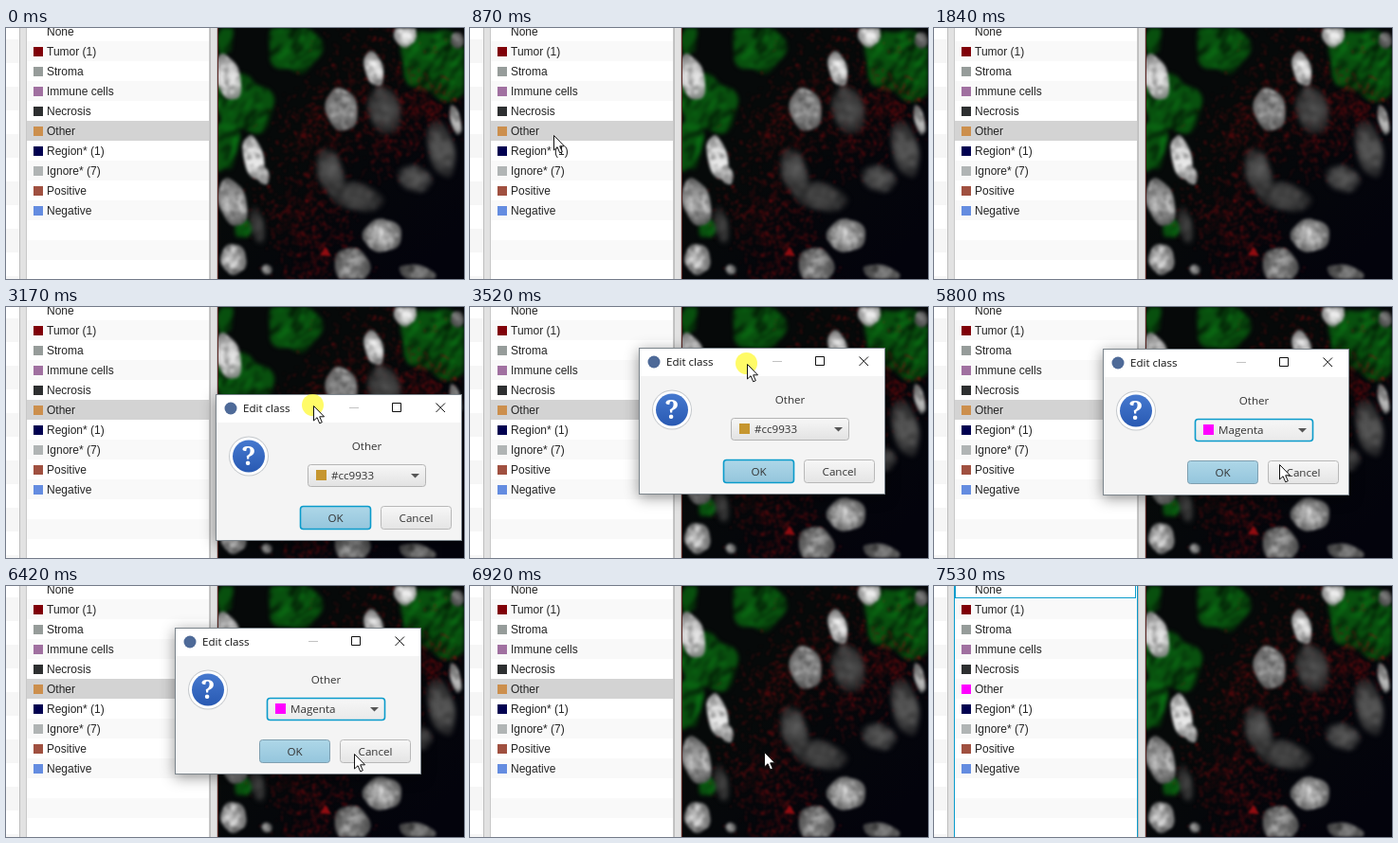
Recreate the animation shown at these times as an HTML page with a canvas. Size 483x265 px, loop 7.73 s.

```html
<!DOCTYPE html>
<html lang="en">
<head>
<meta charset="utf-8">
<title>Edit class colour</title>
<style>
html, body { margin: 0; width: 100%; height: 100%; overflow: hidden; background: #fff; }
canvas { display: block; width: 483px; height: 265px; }
</style>
</head>
<body>
<canvas id="stage" width="483" height="265"></canvas>
<script>
const W = 483, H = 265, LOOP = 7730, STEP = 70;
const ctx = document.getElementById('stage').getContext('2d');
const LIST_FONT = '12px "Liberation Sans", Arial, sans-serif';
const UI_FONT = '11.6px "Open Sans", "Noto Sans", sans-serif';
const BLUE = '#0a9bcb';

let seed = 11;
function rnd() {
  seed = (seed * 1664525 + 1013904223) % 4294967296;
  return seed / 4294967296;
}
const spread = () => (rnd() + rnd() + rnd() - 1.5) / 0.75;
const gray = (v, a = 1) => `rgba(${v},${v},${v},${a})`;
const within = (t, spans) => spans.some(([a, b]) => t >= a && t < b);

function box(c, x, y, w, h, fill) {
  c.fillStyle = fill;
  c.fillRect(x, y, w, h);
}

function disc(c, x, y, r, fill) {
  c.beginPath();
  c.arc(x, y, r, 0, 7);
  c.fillStyle = fill;
  c.fill();
}

function text(str, x, y, font, color, align = 'left') {
  ctx.font = font;
  ctx.fillStyle = color;
  ctx.textAlign = align;
  ctx.fillText(str, x, y);
}

function polygon(c, pts) {
  c.beginPath();
  for (let i = 0; i < pts.length; i += 2) c.lineTo(pts[i], pts[i + 1]);
  c.closePath();
}

function layer(paint) {
  const cv = document.createElement('canvas');
  cv.width = W;
  cv.height = H;
  paint(cv.getContext('2d'));
  return cv;
}

// ---- microscopy picture, painted once ----
// x, y, radii
const GREEN = [[304, 20, 25, 30], [250, 80, 30, 32], [231, 122, 13, 32], [231, 12, 8, 18],
  [456, 38, 38, 38], [251, 212, 9, 10]];
// x, y, radius
const RED = [[385, 58, 44], [402, 112, 34], [325, 105, 32], [312, 185, 40], [330, 240, 40], [448, 85, 24]];
// x, y, radii, brightness
const NUCLEI = [
  [399, 87, 16, 27, 75], [342, 152, 14, 25, 78], [369, 178, 29, 15, 66], [265, 208, 7, 20, 60],
  [431, 159, 18, 14, 88], [459, 128, 13, 32, 82], [354, 86, 16, 24, 150], [421, 6, 12, 14, 235],
  [388, 43, 10, 18, 220], [261, 137, 10, 25, 230], [271, 155, 6, 11, 195], [234, 52, 13, 25, 215],
  [239, 184, 15, 25, 165], [240, 244, 13, 17, 190], [397, 219, 20, 18, 175], [365, 251, 18, 20, 140],
  [434, 259, 19, 9, 110], [476, 13, 7, 9, 110], [474, 97, 5, 17, 165], [275, 255, 6, 5, 160]
];

// Uneven closed outline around the origin.
function blob(c, rx, ry, rough) {
  const p = rnd() * 6, q = rnd() * 6;
  c.beginPath();
  for (let a = 0; a < 6.28; a += .15) {
    const k = 1 + rough * (Math.sin(2 * a + p) + .7 * Math.sin(5 * a + q));
    c.lineTo(Math.cos(a) * rx * k, Math.sin(a) * ry * k);
  }
  c.closePath();
}

function greenPatch(c, [x, y, rx, ry]) {
  c.save();
  c.translate(x, y);
  blob(c, rx, ry, .13);
  c.fillStyle = '#08500e';
  c.fill();
  c.clip();
  for (let i = 0; i < rx * ry / 16; i++) {
    const sx = spread() * rx, sy = spread() * ry;
    c.strokeStyle = rnd() < .4 ? 'rgba(12,120,22,.55)' : 'rgba(2,16,4,.6)';
    c.lineWidth = 1.5 + rnd() * 4;
    c.beginPath();
    c.moveTo(sx, sy);
    c.lineTo(sx + 5 + rnd() * 8, sy - 10 + spread() * 9);
    c.stroke();
  }
  c.restore();
}

function redField(c, [x, y, r]) {
  for (let i = 0; i < r * 9; i++) {
    const px = x + spread() * r, py = y + spread() * r;
    c.strokeStyle = `rgba(${90 + rnd() * 60},12,16,${.12 + rnd() * .3})`;
    c.lineWidth = 1 + rnd() * 2.5;
    c.beginPath();
    c.moveTo(px, py);
    c.lineTo(px + spread() * 4, py + spread() * 4);
    c.stroke();
  }
}

function nucleus(c, [x, y, rx, ry, v]) {
  c.save();
  c.translate(x, y);
  c.rotate(rx > ry ? .25 : -.22);
  blob(c, rx, ry, .05);
  const g = c.createRadialGradient(0, 0, 0, 0, 0, Math.max(rx, ry));
  g.addColorStop(.3, gray(v));
  g.addColorStop(1, gray(v * .6, v < 100 ? .5 : .9));
  c.fillStyle = g;
  c.fill();
  c.clip();
  for (let i = 0; i < rx * ry / 6; i++) {
    const fill = rnd() < .5 ? gray(Math.min(255, v * 1.35), .3) : gray(v * .4, .25);
    disc(c, spread() * rx * .8, spread() * ry * .8, 1.2 + rnd() * 2.6, fill);
  }
  c.restore();
}

const cells = layer(c => {
  const base = c.createLinearGradient(330, 100, 460, 230);
  base.addColorStop(0, '#060909');
  base.addColorStop(1, '#03030c');
  box(c, 223, 0, 260, H, base);
  c.beginPath();
  c.rect(223, 0, 260, H);
  c.clip();
  const stack = (blur, paint) => {
    const img = layer(paint);
    c.filter = `blur(${blur}px)`;
    c.drawImage(img, 0, 0);
    c.filter = 'none';
  };
  stack(2, g => GREEN.forEach(p => greenPatch(g, p)));
  stack(.8, g => {
    RED.forEach(f => redField(g, f));
    polygon(g, [337, 231, 343, 241, 331, 240]);
    g.fillStyle = '#900c10';
    g.fill();
  });
  stack(2.6, g => NUCLEI.filter(n => n[4] < 100).forEach(n => nucleus(g, n)));
  stack(1.6, g => NUCLEI.filter(n => n[4] > 100).forEach(n => nucleus(g, n)));
  box(c, 223, 0, 1, H, '#5c2622');
});

// ---- class list ----
const CLASSES = [['None', ''], ['Tumor (1)', '#800008'], ['Stroma', '#969c9a'],
  ['Immune cells', '#a070a0'], ['Necrosis', '#2d2f30'], ['Other', '#cc8f4d'],
  ['Region* (1)', '#000050'], ['Ignore* (7)', '#b0b4b4'], ['Positive', '#a05040'],
  ['Negative', '#648ce0']];

function drawPanels(t) {
  box(ctx, 0, 0, 223, H, '#fff');
  for (let y = 12; y < H; y += 50) box(ctx, 0, y, 14, 25, '#f6f6f6');
  for (const x of [14, 215]) {
    box(ctx, x, 0, 8, H, '#e2e2e2');
    box(ctx, x, 0, 1, H, '#bdbdbd');
    box(ctx, x + 7, 0, 1, H, '#bdbdbd');
  }
  const done = t >= 6990;
  const focused = done || within(t, [[1290, 1480]]);
  for (let i = 0; i < 13; i++) {
    const y = i * 21 - 7;
    const picked = i === 5 && !done;
    box(ctx, 22, y, 192, 21, i % 2 ? '#f9f9f9' : '#fff');
    if (picked) box(ctx, 22, y, 192, 21, focused ? '#0096c9' : '#d3d3d3');
    if (i >= CLASSES.length) continue;
    const [name, color] = CLASSES[i];
    if (color) box(ctx, 29, y + 6, 10, 10, i === 5 && done ? '#ff00ff' : color);
    text(name, 43, y + 15, LIST_FONT, picked && focused ? '#fff' : '#242424');
  }
  for (const x of [21, 214]) box(ctx, x, 0, 1, H, focused ? BLUE : '#c8c8c8');
  if (done) {
    ctx.strokeStyle = BLUE;
    ctx.lineWidth = 1;
    ctx.strokeRect(22.5, -5.5, 190, 18);
  }
}

// ---- pointer ----
// Each move: start, end, target x and y; the pointer rests in between.
const MOVES = [[0, 0, 384, 246], [200, 870, 85, 112], [1700, 1770, 151, 141], [2890, 2890, 370, 130],
  [2890, 3030, 357, 117], [3030, 3100, 335, 108], [3100, 3170, 324, 104], [3170, 3450, 292, 59],
  [3450, 3590, 292, 60], [3720, 4140, 312, 141], [4900, 4970, 316, 163], [4970, 5600, 364, 166],
  [6070, 6420, 367, 177], [6420, 6780, 310, 175], [6920, 7460, 446, 244]];

// Motion advances in short ticks, counted from the start of the current move.
function tick(t) {
  const s = MOVES.filter(m => m[0] <= t).pop()[0];
  return s + Math.floor((t - s) / STEP) * STEP;
}

function pointerAt(t) {
  let x = 0, y = 0;
  for (const [from, to, tx, ty] of MOVES) {
    if (t < from) break;
    const u = to > from ? Math.min(1, (t - from) / (to - from)) : 1;
    const k = u * u * (3 - 2 * u);
    x += (tx - x) * k;
    y += (ty - y) * k;
  }
  return [Math.round(x), Math.round(y)];
}

function drawPointer(t, x, y) {
  if (!within(t, [[200, 1840], [2890, 4410], [4560, 7530]])) return;
  if (within(t, [[1290, 1480], [3030, 3720], [6850, 6920]])) {
    disc(ctx, x - .5, y - .5, 11.5, 'rgba(255,250,60,.78)');
  }
  ctx.save();
  ctx.translate(x + .5, y + .5);
  polygon(ctx, [0, 0, 0, 15.5, 3.6, 12.2, 6.2, 18.3, 8.8, 17.2, 6.2, 11.3, 11, 11.3]);
  ctx.fillStyle = '#fff';
  ctx.fill();
  ctx.lineWidth = 1;
  ctx.strokeStyle = '#111';
  ctx.stroke();
  ctx.restore();
}

// ---- dialog ----
function button(x, y, w, h, top, bottom, edge, ring) {
  const g = ctx.createLinearGradient(0, y, 0, y + h);
  g.addColorStop(0, top);
  g.addColorStop(1, bottom);
  ctx.beginPath();
  ctx.roundRect(x + .5, y + .5, w - 1, h - 1, 3);
  ctx.fillStyle = g;
  ctx.fill();
  ctx.lineWidth = ring ? 1.6 : 1;
  ctx.strokeStyle = ring ? BLUE : edge;
  ctx.stroke();
}

function shadowed(x, y, w, h, fill, blur) {
  ctx.save();
  ctx.shadowColor = 'rgba(0,0,0,.42)';
  ctx.shadowBlur = blur;
  ctx.shadowOffsetY = 3;
  box(ctx, x, y, w, h, fill);
  ctx.restore();
}

function line(x1, y1, x2, y2) {
  ctx.moveTo(x1, y1);
  ctx.lineTo(x2, y2);
}

function drawTitleBar() {
  box(ctx, 1, 1, 258, 29, '#fff');
  disc(ctx, 16, 15, 6.5, '#4e6a98');
  text('Edit class', 29, 19, UI_FONT, '#111');
  ctx.lineWidth = 1;
  ctx.beginPath();
  line(141, 14.5, 151, 14.5);
  ctx.strokeStyle = '#c2c2c2';
  ctx.stroke();
  ctx.beginPath();
  ctx.rect(186.5, 9.5, 9, 9);
  line(232.5, 9.5, 242, 19);
  line(242, 9.5, 232.5, 19);
  ctx.strokeStyle = '#111';
  ctx.stroke();
}

function drawDialog(t, px) {
  // The window trails the dragging pointer by one tick.
  const [cx, cy] = pointerAt(t < 3100 ? 3030 : tick(Math.min(t, 3719)) - STEP);
  ctx.save();
  ctx.translate(cx - 114, cy - 16);
  shadowed(0, 0, 260, 155, '#7c858c', 14);
  box(ctx, 1, 1, 258, 153, '#f4f4f4');
  drawTitleBar();

  disc(ctx, 35, 65.5, 21, '#c4c8cc');
  disc(ctx, 35, 65.5, 20, '#fff');
  const glow = ctx.createLinearGradient(0, 48, 0, 83);
  glow.addColorStop(0, '#4679cf');
  glow.addColorStop(1, '#2859b2');
  disc(ctx, 35, 65.5, 17, glow);
  text('?', 35, 75, 'bold 27px "Noto Serif", serif', '#fff', 'center');

  text('Other', 159.5, 59, UI_FONT, '#333', 'center');
  const onCombo = t >= 4560, magenta = t >= 5800;
  button(97, 74, 125, 24, '#f7f7f7', t >= 4070 ? '#e9e9e9' : '#e2e2e2', '#b4b4b4', onCombo);
  box(ctx, 106, 80, 11, 11, magenta ? '#ff00ff' : '#c6962f');
  text(magenta ? 'Magenta' : '#cc9933', 122, 90, UI_FONT, '#333');
  polygon(ctx, [206, 84, 215, 84, 210.5, 88.5]);
  ctx.fillStyle = '#555';
  ctx.fill();

  const overOk = t > 6420 && px < 342;
  button(89, 118, 75, 25, overOk ? '#bfe2f0' : '#aed7e8', '#94c5dc', '#7f9fb0', !onCombo);
  text('OK', 126.5, 135, UI_FONT, '#333', 'center');
  button(174, 118, 75, 25, '#f7f7f7', '#e4e4e4', '#b8b8b8', false);
  text('Cancel', 211.5, 135, UI_FONT, '#333', 'center');
  ctx.restore();
}

// ---- colour palette popup ----
const DARK = '003333 001a80 1a0068 330033 4d001a 990000 993300 994d00 996600 999900 666600 003300'
  .split(' ').map(s => [0, 2, 4].map(k => parseInt(s.slice(k, k + 2), 16)));
const colX = i => 296 + i * 16.1;

// Full and half-bright hue pairs from cyan round to green.
function bright(i) {
  const light = (i % 2 === 1) !== (i > 9) ? 25 : 50;
  return `hsl(${180 + 60 * Math.floor(i / 2)},100%,${light}%)`;
}

function tile(x, y, color) {
  box(ctx, x - 7.2, y - 7.2, 14.4, 14.4, color);
}

function bigTile(x, y, color) {
  shadowed(x - 13, y - 13, 26, 26, '#dfe9ec', 5);
  box(ctx, x - 11.5, y - 11.5, 23, 23, color);
}

function drawPalette(t, px, py) {
  shadowed(275, 143, 230, 140, '#c4c4c4', 14);
  box(ctx, 276, 144, 230, 140, '#f4f4f4');
  for (let i = 0; i < 12; i++) {
    const x = colX(i);
    tile(x, 164, bright(i));
    tile(x, 191, gray(Math.round(255 * (1 - (i / 11) ** 1.15))));
    for (let r = 0; r < 4; r++) {
      tile(x, 208 + r * 16.2, `rgb(${DARK[i].map(v => v + r * 25)})`);
    }
  }
  if (t < 4970) bigTile(colX(8), 240, '#cc9933');
  else if (t < 5040) disc(ctx, 424, 241, 20, 'rgba(255,225,60,.28)');
  if (py >= 156) {
    const i = Math.round((px - 296) / 16.1);
    bigTile(colX(i), 164, bright(i));
  }
}

function draw(t) {
  const [px, py] = pointerAt(tick(t));
  drawPanels(t);
  ctx.drawImage(cells, 0, 0);
  if (within(t, [[2890, 6920]])) drawDialog(t, px);
  if (within(t, [[4630, 5800]])) drawPalette(t, px, py);
  drawPointer(t, px, py);
}

const began = performance.now();
function loop() {
  draw((performance.now() - began) % LOOP);
  requestAnimationFrame(loop);
}
loop();
</script>
</body>
</html>
```
